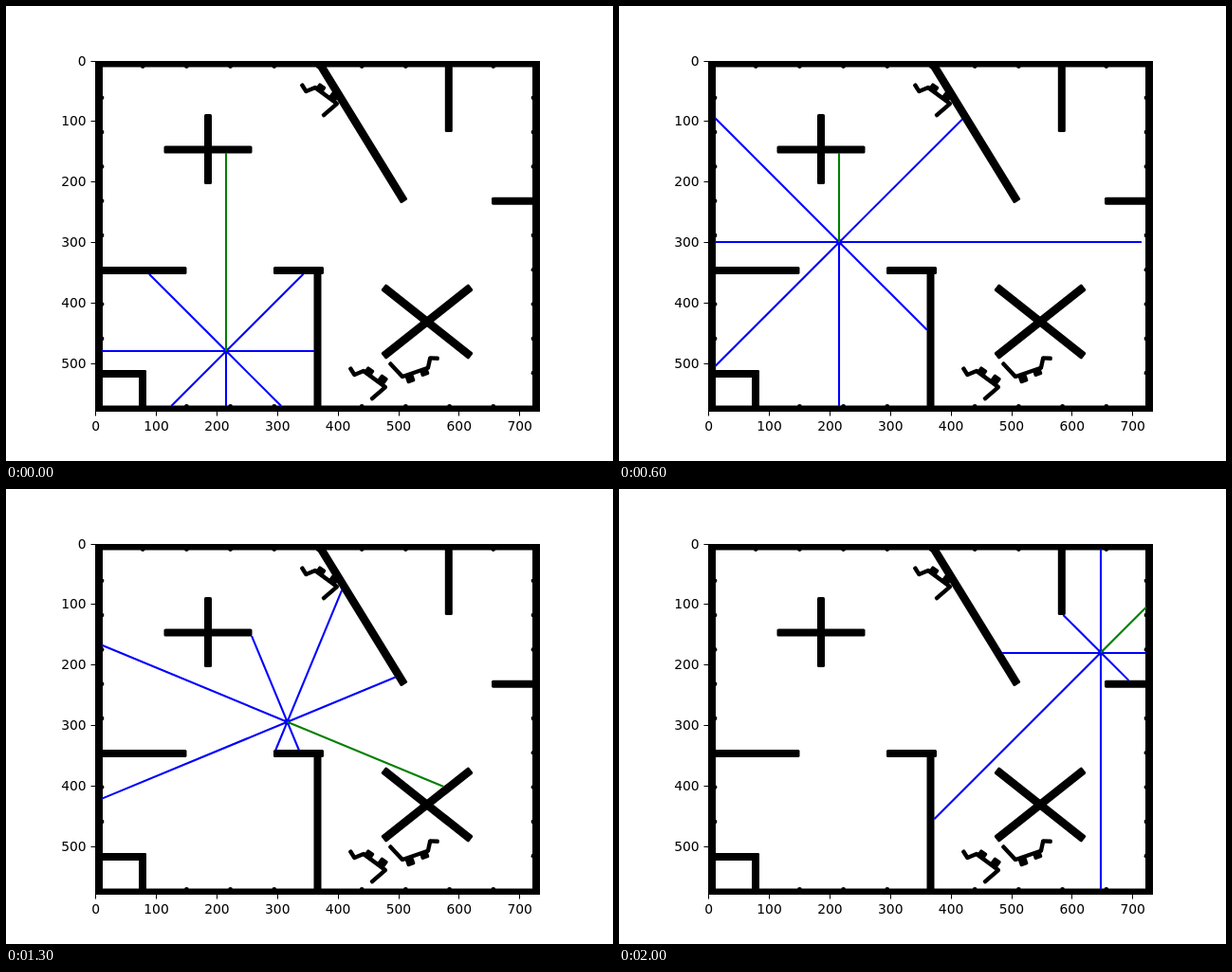
These frames come from a looping animation (640 px wide and 480 px high, 2100 ms). An HTML page:

```html
<!DOCTYPE html>
<html lang="en">
<head>
<meta charset="utf-8">
<title>Range sensor simulation</title>
<style>
  html, body { margin: 0; width: 100%; height: 100%; overflow: hidden; background: #fff; }
  svg { display: block; width: 640px; height: 480px; }
  text { font: 13.89px "DejaVu Sans", sans-serif; }
  #axes { stroke: #000; stroke-width: 1; fill: none; }
  #rays { stroke: #00f; stroke-width: 2.1; }
</style>
</head>
<body>
<svg viewBox="0 0 640 480">
  <g id="walls"></g>
  <circle id="robot" r="3.2" fill="#a02060"/>
  <g id="rays"></g>
  <g id="axes"><rect x="94.5" y="58.5" width="468" height="369"/></g>
  <g id="labels"></g>
</svg>
<script>
const SCALE = 0.6385, LEFT = 94.3, TOP = 57.6;
const CELL_W = 72, CELL_H = 60;
const STEP = 100, STEPS = 21, RANGE = 500 * SCALE;
const ROOM = { l: 101.5, t: 63.5, r: 555.5, b: 422 };

const byId = id => document.getElementById(id);
const px = x => LEFT + SCALE * x;
const py = y => TOP + SCALE * y;
const rad = deg => deg * Math.PI / 180;

function add(parent, tag, attrs, text) {
  const el = document.createElementNS('http://www.w3.org/2000/svg', tag);
  for (const k in attrs) el.setAttribute(k, attrs[k]);
  if (text !== undefined) el.textContent = text;
  byId(parent).append(el);
  return el;
}

// Bars are given by centre, length, angle and thickness
const bars = [];
function bar(x, y, len, angle = 0, w = 8) {
  bars.push({ x, y, len, w, cos: Math.cos(rad(angle)), sin: Math.sin(rad(angle)) });
  add('walls', 'rect', {
    x: x - len / 2, y: y - w / 2, width: len, height: w, rx: 1.6,
    transform: `rotate(${angle} ${x} ${y})`
  });
}

// Crooked obstacle: a spine with two blocks, a hook at its end and a leg at its root
function clutter(x, y, spine, leg) {
  const c = Math.cos(rad(spine)), s = Math.sin(rad(spine));
  const at = (u, v) => [x + u * c - v * s, y + u * s + v * c];
  const limb = ([x1, y1], [x2, y2]) => bar((x1 + x2) / 2, (y1 + y2) / 2,
    Math.hypot(x2 - x1, y2 - y1) + 3, Math.atan2(y2 - y1, x2 - x1) * 180 / Math.PI, 4.4);
  const root = at(0, 0), neck = at(28.5, 0), bend = at(34, -9);
  limb(root, [x + 19 * Math.cos(rad(leg)), y + 19 * Math.sin(rad(leg))]);
  limb(root, neck);
  limb(neck, bend);
  limb(bend, at(41.5, -6));
  bar(...at(7, 4.5), 9, spine, 9);
  bar(...at(23.5, 3.5), 9, spine, 7);
}

// Room with its small notches
add('walls', 'path', { d: 'M94.5 58H562.5V427.5H94.5ZM102 64.5V421.5H555V64.5Z', 'fill-rule': 'evenodd' });
const notch = (cx, cy) => add('walls', 'circle', { cx, cy, r: 2.4 });
for (let i = 1; i < 10; i++) {
  const x = 98 + 46.2 * i, y = 60.5 + 36.3 * i;
  notch(x, 63.5);
  notch(x, 422.5);
  notch(101, y);
  notch(556, y);
}

bar(145, 279, 91);
bar(308.5, 279, 53);
bar(328.5, 350, 148, 90);
bar(122, 388, 52);
bar(144, 405, 42, 90);
bar(213, 151.5, 93);
bar(213, 151, 74, 90);
bar(375, 133, 172, 58.4, 8.6);
bar(466.8, 96, 74, 90);
bar(536, 205.7, 48);
for (const tilt of [-38.5, 38.5]) bar(444, 333, 118, tilt, 8.6);

clutter(400, 402, 216.5, 139);
clutter(349, 103, 216.5, 139);
clutter(418, 391, 341, 227);

for (let v = 0; v <= 700; v += 100) {
  const x = Math.floor(px(v) + 0.5) + 0.5;
  add('axes', 'path', { d: `M${x} 427.5v5` });
  add('labels', 'text', { x: px(v) + 0.4, y: 448, 'text-anchor': 'middle' }, v);
  if (v > 500) continue;
  const y = Math.floor(py(v) + 0.5) + 0.5;
  add('axes', 'path', { d: `M94.5 ${y}h-5` });
  add('labels', 'text', { x: 84.7, y: Math.round(py(v) + 5), 'text-anchor': 'end' }, v);
}

// Step, grid column, grid row, heading in degrees (counter-clockwise from right)
const route = [
  [0, 3, 8, 90], [6, 3, 5, 90], [7, 3.5, 4.5, 45], [9, 4, 4, 0],
  [12, 4.26, 4.6, -45], [13, 4.4, 4.91, -22.5],
  [16, 6.67, 5, 22.5], [17, 6.8, 5, 45], [20, 9, 3, 45]
];

function poseAt(step) {
  const i = Math.max(1, route.findIndex(k => k[0] >= step));
  const a = route[i - 1], b = route[i];
  const f = (step - a[0]) / (b[0] - a[0]);
  const [, col, row, heading] = a.map((v, n) => v + (b[n] - v) * f);
  return { x: px(col * CELL_W), y: py(row * CELL_H), heading };
}

function blocked(x, y) {
  if (x < ROOM.l || x > ROOM.r || y < ROOM.t || y > ROOM.b) return true;
  return bars.some(b => {
    const dx = x - b.x, dy = y - b.y;
    return Math.abs(dx * b.cos + dy * b.sin) < b.len / 2 &&
           Math.abs(dy * b.cos - dx * b.sin) < b.w / 2;
  });
}

function cast(x, y, dx, dy) {
  let d = 0;
  while (d < RANGE && !blocked(x + dx * d, y + dy * d)) d += 0.5;
  return Math.min(d, RANGE);
}

// The last ray points along the heading
const rays = Array.from({ length: 8 }, (_, i) =>
  add('rays', 'line', i == 7 ? { stroke: '#008000' } : {}));

function show(step) {
  const { x, y, heading } = poseAt(step);
  byId('robot').setAttribute('cx', x);
  byId('robot').setAttribute('cy', y);
  rays.forEach((ray, i) => {
    const a = rad(heading + (i + 1) * 45);
    const dx = Math.cos(a), dy = -Math.sin(a), d = cast(x, y, dx, dy);
    // Upright and level rays sit on whole pixels
    const snap = Math.abs(dx * dy) < 1e-6 ? Math.round : v => v;
    const ends = { x1: x, y1: y, x2: x + dx * d, y2: y + dy * d };
    for (const k in ends) ray.setAttribute(k, snap(ends[k]));
  });
}

let shown = 0;
const start = performance.now();
function tick(now) {
  const step = Math.floor(Math.max(0, now - start) / STEP) % STEPS;
  if (step !== shown) show(shown = step);
  requestAnimationFrame(tick);
}
show(0);
requestAnimationFrame(tick);
</script>
</body>
</html>
```
